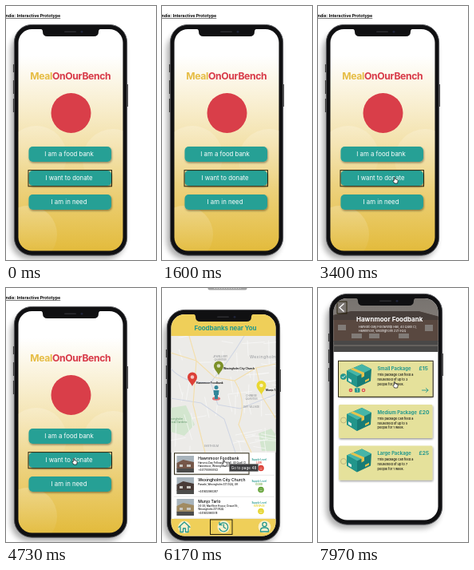
An HTML page for the animation above (8000 ms loop, 188x318 px).

```html
<!DOCTYPE html>
<html lang="en">
<head>
<meta charset="utf-8">
<title>Interactive Prototype</title>
<style>
  html, body { margin: 0; width: 100%; height: 100%; overflow: hidden; background: #fff; }
  svg { display: block; width: 100vw; height: 100vh; font-family: Inter, Roboto, sans-serif; }
  .mid { text-anchor: middle; }
  .bold { font-weight: 700; }
  .teal { fill: #23988d; }
  .white { fill: #fff; }
  .line { fill: none; stroke: #23988d; stroke-width: 1.3; stroke-linecap: round; stroke-linejoin: round; }
  .focus { fill: none; stroke: #29230d; stroke-width: 1; }
  .place { fill: #85888c; font-size: 3.2px; text-anchor: middle; }

  .timed { animation: 8s step-end infinite; }
  #home { animation-name: home; }
  #nearby { animation-name: nearby; }
  #packages { animation-name: packages; }
  #tip { animation-name: tip; }
  #arrow { animation-name: arrow; }
  #hand { animation-name: hand; }
  #pill { animation: pill 8s linear infinite; }
  #pointer { animation: move 8s ease-in-out infinite; }

  @keyframes home { 0% { opacity: 1 } 61.25%, 100% { opacity: 0 } }
  @keyframes nearby { 0% { opacity: 0 } 61.25% { opacity: 1 } 85%, 100% { opacity: 0 } }
  @keyframes packages { 0% { opacity: 0 } 85%, 100% { opacity: 1 } }
  @keyframes tip { 0% { opacity: 0 } 73.5% { opacity: 1 } 85%, 100% { opacity: 0 } }
  @keyframes arrow { 0% { opacity: 0 } 19.5% { opacity: 1 } 31.5%, 100% { opacity: 0 } }
  @keyframes hand { 0% { opacity: 0 } 31.5%, 100% { opacity: 1 } }
  @keyframes pill {
    0%, 61.24% { opacity: 0 }
    61.25%, 77% { opacity: 1 }
    79.5%, 84.99% { opacity: 0 }
    85%, 96.5% { opacity: 1 }
    98.5%, 100% { opacity: 0 }
  }
  @keyframes move {
    0%, 19.5% { transform: translate(192px, 238px) }
    21.5% { transform: translate(177px, 231px) }
    28.5%, 30.5% { transform: translate(125px, 218px) }
    39%, 43% { transform: translate(97px, 218px) }
    52%, 61% { transform: translate(86px, 217px) }
    69%, 93.5% { transform: translate(78.5px, 219px) }
    98.5%, 100% { transform: translate(97px, 121px) }
  }
</style>
</head>
<body>
<svg viewBox="0 0 188 318" preserveAspectRatio="none">
  <defs>
    <clipPath id="screen"><rect x="15.5" y="29" width="131" height="277.5" rx="17"/></clipPath>
    <filter id="soft" x="-20%" y="-10%" width="140%" height="120%"><feGaussianBlur stdDeviation="3.5"/></filter>
    <filter id="lift" x="-10%" y="-20%" width="120%" height="150%">
      <feDropShadow dx=".7" dy="1.5" stdDeviation="1" flood-opacity=".4"/>
    </filter>
    <linearGradient id="sun" x2="0" y2="1">
      <stop offset=".12" stop-color="#fff"/>
      <stop offset=".45" stop-color="#f5e6b8"/>
      <stop offset="1" stop-color="#e3bb3c"/>
    </linearGradient>
    <linearGradient id="bubble" x2="0" y2="1">
      <stop stop-color="#fff" stop-opacity=".2"/>
      <stop offset="1" stop-color="#fff" stop-opacity="0"/>
    </linearGradient>
    <linearGradient id="dusk" x2="0" y2="1">
      <stop stop-color="#77736f"/>
      <stop offset="1" stop-color="#8d8580"/>
    </linearGradient>
    <g id="phone">
      <rect x="6" y="32" width="143" height="285" rx="23" fill="#000" opacity=".32" filter="url(#soft)"/>
      <path d="M9.6 73v10M9.6 93v17M9.6 116v17M152.2 98v28" stroke="#333" stroke-width="1.4"/>
      <rect x="10.4" y="23.4" width="141.2" height="288.8" rx="22" fill="#101012" stroke="#55565a" stroke-width="1"/>
    </g>
    <g id="notch">
      <path d="M43 28.5H119q-3 .5-3 3.5 0 6-6 6H52q-6 0-6-6 0-3-3-3.5Z" fill="#101012"/>
      <rect x="73" y="31.5" width="15" height="1.6" rx=".8" fill="#2c2c30"/>
      <circle cx="95" cy="32.3" r="1.4" fill="#20243a"/>
    </g>
    <g id="marker">
      <path d="M0 6.5C-1.5 2.5-6-.5-6-5A6 6 0 0 1 6-5C6-.5 1.5 2.5 0 6.5Z"/>
      <circle cy="-5" r="2.3" fill="#fff" opacity=".7"/>
    </g>
    <g id="parcel">
      <path d="M0 8 19 0 31 6 30 21 13 29 0 21Z" fill="#177c76"/>
      <path d="M0 8 19 0 31 6 13 15Z" fill="#46b5a7"/>
      <path d="M0 8 13 15V29L0 21Z" fill="#22958b"/>
      <path d="M8 4.6 22 10.5V15L18.5 17V12.3L4.5 6.2Z" fill="#e5c34e"/>
      <path d="M2 17 6 19.4V23L2 20.7Z" fill="#d9eae2"/>
      <path d="M23 20 28 17.6V20L23 22.4Z" fill="#e5c34e"/>
    </g>
  </defs>

  <rect width="188" height="318" fill="#fff"/>

  <g id="home" class="timed">
    <text class="bold" x="-.5" y="14" font-size="5.3" text-decoration="underline">ndix: Interactive Prototype</text>
    <use href="#phone"/>
    <g clip-path="url(#screen)">
      <rect x="15" y="29" width="132" height="278" fill="url(#sun)"/>
      <g fill="url(#bubble)">
        <circle cx="38" cy="188" r="38"/>
        <circle cx="134" cy="192" r="38"/>
        <circle cx="28" cy="286" r="36"/>
      </g>
      <text class="mid bold" x="80.8" y="92" font-size="12.2" letter-spacing="-.35" fill="#d83a49"><tspan fill="#e6bd45">Meal</tspan>OnOurBench</text>
      <circle cx="81.5" cy="134" r="25" fill="#d93e49"/>
      <g id="choices"></g>
      <rect class="focus" x="28" y="205.6" width="104.5" height="20.2"/>
    </g>
    <use href="#notch"/>
  </g>

  <g id="nearby" class="timed">
    <use href="#phone" x="-4" y="4"/>
    <g transform="translate(-4 4)" clip-path="url(#screen)"><g transform="translate(4 -4)">
      <rect x="11" y="32" width="132" height="279" fill="#fff"/>
      <rect x="11" y="60" width="132" height="146" fill="#ecebe8"/>
      <path d="M11 150 30 147 41 171 28 185 11 180ZM121 182l16-6 6 8v20h-18Z" fill="#d3e6cf"/>
      <g id="streets" fill="none" stroke="#fafafa" stroke-width=".7"></g>
      <path d="M11 101Q30 121 61 118 84 92 103 60M11 138 49 144 78 164 92 206M61 118 70 146 98 151 143 133" fill="none" stroke="#d0d6e3" stroke-width="1.1"/>
      <path d="M11 81 43 91 66 112 91 116 118 100 143 95M91 116Q107 142 96 171L112 206M34 60 43 91 39 146 54 206M118 100 126 137 143 164" fill="none" stroke="#f3dfae" stroke-width="1.2"/>
      <g class="place">
        <text x="73" y="87">JEWELLERY</text><text x="73" y="91">QUARTER</text>
        <text x="112" y="136">CHINESE</text><text x="112" y="140">QUARTER</text>
        <text x="112" y="150">GAY VILLAGE</text><text x="62" y="199">EASTHOLM</text>
      </g>
      <text x="110" y="88" font-size="5.2" letter-spacing=".4" fill="#94979b">Wexingholm</text>
      <g font-size="3.3" fill="#5b9366"><text x="10" y="165">exingholm</text><text x="10" y="169">nical Gardens</text></g>
      <use href="#marker" x="38" y="116.5" fill="#dc4037"/>
      <use href="#marker" x="71" y="102.5" fill="#7c9028"/>
      <use href="#marker" x="124.5" y="127" fill="#e9d832"/>
      <ellipse cx="68" cy="138.5" rx="5" ry="2.2" fill="#d94d51" opacity=".75"/>
      <circle cx="68" cy="124.5" r="2.5" fill="#31869a"/>
      <path d="M64.5 128h7l-.6 6H70v5h-4v-5h-.9Z" fill="#31869a"/>
      <g font-size="3.25" font-weight="600">
        <text x="43" y="119.5">Hawnmoor Foodbank</text>
        <text x="77" y="101.5">Wexingholm City Church</text>
        <text x="130" y="129">Munjo Tarlo</text>
      </g>
      <rect x="11" y="32" width="132" height="28" fill="#efcf59"/>
      <text class="mid bold teal" x="79.5" y="53.2" font-size="8" letter-spacing="-.1">Foodbanks near You</text>
      <g id="banks"></g>
      <rect class="focus" x="15.5" y="206.8" width="93.5" height="26.4"/>
      <rect x="11" y="289" width="132" height="22" fill="#efcf59"/>
      <g fill="#fff" opacity=".7">
        <circle cx="28" cy="299.5" r="7.8"/><circle cx="77.3" cy="299" r="7.8"/><circle cx="128.5" cy="299" r="7.8"/>
      </g>
      <path class="line" d="M21 299.5 28 293l7 6.5M23 298.5v7h3.5v-4.5h3v4.5H33v-7M72.6 296.2a5.5 5.5 0 1 1-.6 5M72 293.5v3.2h3.2M77.3 296v3.5l2.5 1.5"/>
      <circle class="line" cx="128.5" cy="296" r="2.6"/>
      <path class="line" d="M123.5 305v-1.5q0-3.5 5-3.5t5 3.5v1.5Z"/>
      <rect class="focus" x="60.5" y="290" width="27.5" height="18.5"/>
    </g></g>
    <use href="#notch" x="-4" y="4"/>
  </g>

  <g id="packages" class="timed">
    <use href="#phone" x="4" y="-16"/>
    <g transform="translate(4 -16)" clip-path="url(#screen)"><g transform="translate(-4 16)">
      <rect x="19" y="12" width="133" height="279" fill="#fff"/>
      <rect x="19" y="12" width="133" height="68" fill="url(#dusk)"/>
      <path d="M19 34 42 29H126L152 36V67H19Z" fill="#594840"/>
      <path d="M19 34 42 29H126L152 36V40H19Z" fill="#483f3b"/>
      <path d="M25 46h10v7H25ZM42 57h13v6H42ZM64 57h13v6H64ZM101 57h13v6h-13ZM134 46h10v8h-10Z" fill="#817b77"/>
      <rect x="19" y="66" width="133" height="14" fill="#494847"/>
      <path d="M19 72H152" stroke="#65615e" stroke-width="2"/>
      <text class="mid bold white" x="89.7" y="41.8" font-size="8">Hawnmoor Foodbank</text>
      <g class="white" font-size="3.75">
        <text x="51" y="49.8">Harvest-Day Fellowship Hall, 40 Quell Cl,</text>
        <text x="51" y="55.3">Hawnmoor, Wexingholm ZZ1 9QQ</text>
      </g>
      <path d="M32.5 19.5 27 24.5 32.5 29.5" fill="none" stroke="#fff" stroke-width="1.3"/>
      <rect class="focus" x="24" y="17" width="12" height="15"/>
      <g id="sizes"></g>
      <rect class="focus" x="25.5" y="91.3" width="118.7" height="45"/>
      <circle cx="31.8" cy="111" r="3.8" fill="#23988d"/>
      <path d="M29.8 111 31.3 112.5 34 109.5" fill="none" stroke="#fff" stroke-width="1"/>
      <g fill="#d9483f"><circle cx="41" cy="128" r="2.3"/><circle cx="57" cy="128" r="2.3"/></g>
      <path d="M39.8 128h2.4M55.8 128h2.4M57 126.8v2.4" stroke="#fff" stroke-width=".7"/>
      <rect x="46" y="125.3" width="6.5" height="5.4" rx="1" fill="#23988d"/>
      <text class="mid white" x="49.2" y="129.5" font-size="4.2">1</text>
      <path class="line" style="stroke-width:.9" d="M130.5 128h7.5M135.5 125.5l2.5 2.5-2.5 2.5"/>
    </g></g>
    <use href="#notch" x="4" y="-16"/>
  </g>

  <g id="pill">
    <rect x="57.5" y="-9" width="49" height="11.5" rx="2" fill="#a0a0a0"/>
    <path d="M65 .5H99" stroke="#d8d8d8" stroke-width=".8" stroke-dasharray="2 1"/>
  </g>

  <g id="tip" class="timed">
    <rect x="84.5" y="220.5" width="36" height="9" fill="#3d3d3f" stroke="#777" stroke-width=".5"/>
    <text class="mid white" x="102.5" y="226.7" font-size="4.7">Go to page 48</text>
  </g>

  <g id="pointer">
    <path id="arrow" class="timed" d="M-1.5-3.5V3.5L0 2.2 1 4.5 2.3 4 1.3 1.8H3.5Z" fill="#000" stroke="#fff" stroke-width=".6"/>
    <path id="hand" class="timed" d="M-1.2 4 -3 1.2Q-3.2 0-1.7.6V-3.3Q-1-4.6-.4-3.3V-1Q.6-1.7 1-.7 2-1.2 2.3-.2 3.2-.3 3.2.8L2.6 4Z" fill="#fff" stroke="#111" stroke-width=".7" stroke-linejoin="round"/>
  </g>
</svg>

<script>
  const fill = (id, items, draw) => {
    document.getElementById(id).innerHTML = items.map(draw).join('');
  };

  fill('choices', ['I am a food bank', 'I want to donate', 'I am in need'], (label, i) => {
    const y = 176 + i * 30;
    return `<rect x="28.5" y="${y}" width="103.5" height="19" rx="5" fill="#27a095" filter="url(#lift)"/>
      <text class="mid white" x="79" y="${y + 12.2}" font-size="7.8">${label}</text>`;
  });

  // Minor streets: a loose, slightly rotated grid with seeded jitter.
  let seed = 7;
  const random = () => (seed = seed * 16807 % 2147483647) / 2147483647;
  fill('streets', Array.from({ length: 60 }), (_, i) => {
    const x = 11 + random() * 128, y = 62 + random() * 140;
    const length = 12 + random() * 24, angle = (i % 2 ? 1.25 : -.3) + random() * .5;
    return `<path d="M${x} ${y}l${length * Math.cos(angle)} ${length * Math.sin(angle)}"/>`;
  });

  const banks = [
    { y: 210, name: 'Hawnmoor Foodbank', level: 'LOW', color: '#dc4037', wall: '#755749',
      lines: ['Harvest-Day Fellowship Hall, 40 Quell Cl,', 'Hawnmoor, Wexingholm ZZ1 9QQ', '+447700900142'] },
    { y: 237, name: 'Wexingholm City Church', level: 'GOOD', color: '#66a43a', wall: '#493c38',
      lines: ['Parade, Wexingholm ZZ1 3QQ, UK', '', '+441632960287'] },
    { y: 264, name: 'Munjo Tarlo', level: 'AVERAGE', color: '#e5d52f', wall: '#a18b62',
      lines: ['24-26, Marlfleet House, Dravel St,', 'Wexingholm ZZ1 8QQ', '+441632960518'] }
  ];
  fill('banks', banks, ({ y, name, level, color, wall, lines }) => `
    <path d="M15 ${y + 24.3}H141" stroke="#ddd" stroke-width=".7"/>
    <rect x="18.5" y="${y}" width="21.5" height="21" fill="#a8b4bc"/>
    <path d="M18.5 ${y + 9}l8-4 13.5 3v9H18.5Z" fill="${wall}"/>
    <path d="M18.5 ${y + 16}H40v5H18.5Z" fill="#4c4c4b"/>
    <path d="M22 ${y + 11}h4v3h-4ZM31 ${y + 11}h5v3h-5Z" fill="#c9c8c3"/>
    <text x="45.3" y="${y + 5.2}" font-size="5" font-weight="500">${name}</text>
    ${lines.map((line, i) => `<text x="45.3" y="${y + [9.7, 13.5, 19.3][i]}" font-size="3.1" font-weight="500" fill="#111">${line}</text>`).join('')}
    <g class="mid" font-size="3" font-weight="600">
      <text class="teal" x="121.7" y="${y + 5.5}">Supply Level</text>
      <text x="121.7" y="${y + 9.6}" fill="${color}">${level}</text>
    </g>
    <circle cx="124" cy="${y + 15.5}" r="3.8" fill="${color}"/>
    <path d="M122.2 ${y + 16.8}h3.6M122.7 ${y + 14.5}h.7M124.7 ${y + 14.5}h.7" stroke="#fff" stroke-width=".6"/>`);

  const sizes = [
    { y: 91.5, height: 44.5, title: 'Small', price: 15, people: 3 },
    { y: 146, height: 42, title: 'Medium', price: 20, people: 5 },
    { y: 197.5, height: 43, title: 'Large', price: 25, people: 7 }
  ];
  fill('sizes', sizes, ({ y, height, title, price, people }) => `
    <rect x="26" y="${y}" width="117.5" height="${height}" rx="1.5" fill="#e5e19b" filter="url(#lift)"/>
    <circle cx="32" cy="${y + 19.5}" r="3.5" fill="none" stroke="#a9a474" stroke-width=".7"/>
    <use href="#parcel" x="36" y="${y + 4}"/>
    <g class="bold teal">
      <text x="74.5" y="${y + 11.7}" font-size="5.9">${title} Package</text>
      <text x="126.6" y="${y + 11.7}" font-size="6.7">£${price}</text>
    </g>
    <g font-size="3.85" font-weight="500" fill="#111">
      <text x="74.5" y="${y + 18.8}">This package can feed a</text>
      <text x="74.5" y="${y + 24.5}">household of up to ${people}</text>
      <text x="74.5" y="${y + 30.2}">people for 1 week.</text>
    </g>`);
</script>
</body>
</html>
```
